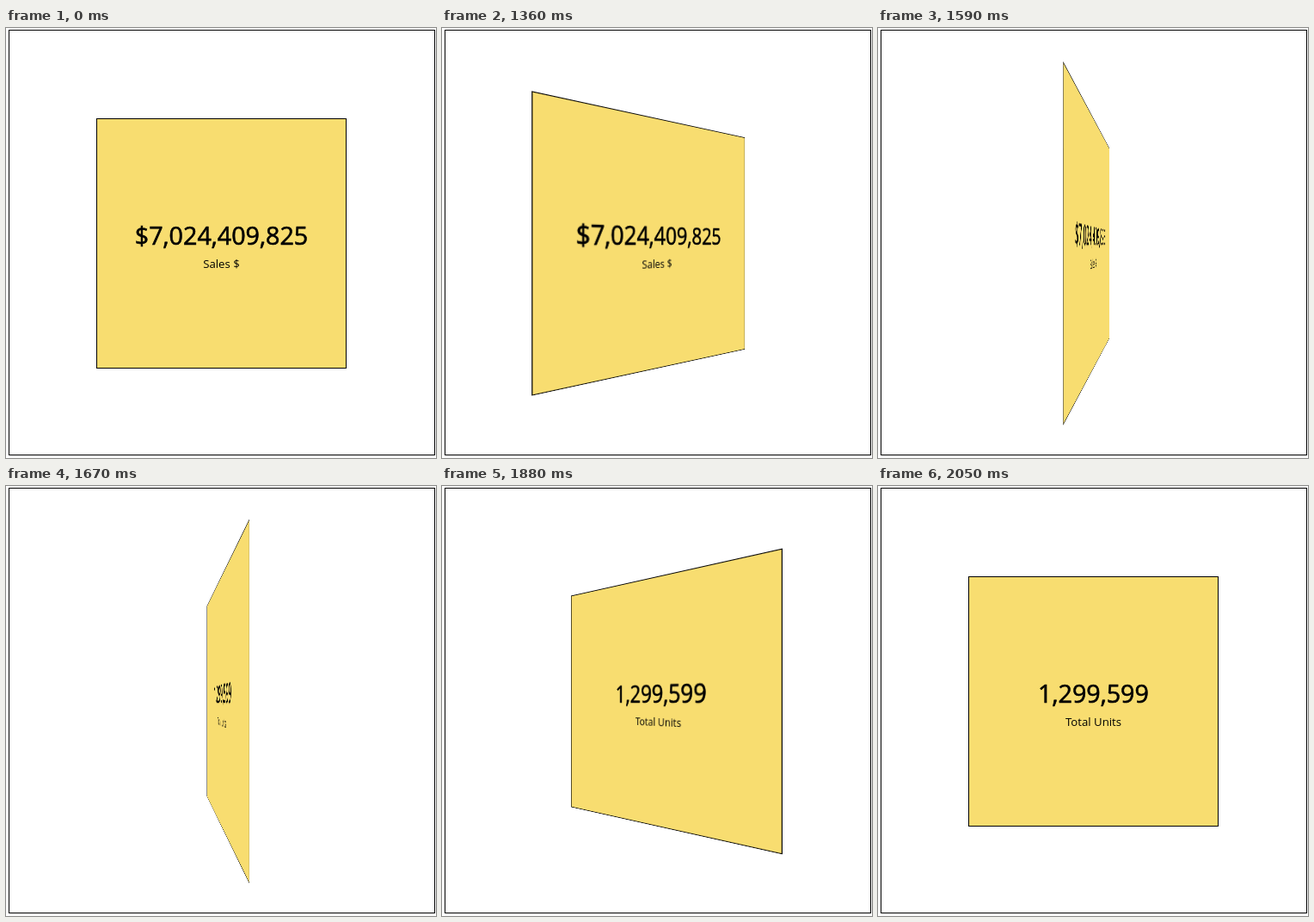
An HTML page that plays this animation: 500x500 px, repeating every 2.97 s.

```html
<!DOCTYPE html>
<html lang="en">
<head>
<meta charset="utf-8">
<title>Flip card</title>
<style>
  html, body { margin: 0; width: 100%; height: 100%; overflow: hidden; background: #fff; }
  .stage { position: relative; width: 500px; height: 500px; overflow: hidden; }
  .frame {
    position: absolute; left: 3px; top: 2px; width: 496px; height: 495px;
    box-sizing: border-box; border: 1px solid #000;
  }
  .scene {
    position: absolute; left: 105px; top: 105px; width: 291px; height: 291px;
    perspective: 458px;
  }
  .card { position: absolute; inset: 0; transform-style: preserve-3d; }
  .face {
    position: absolute; inset: 0; box-sizing: border-box;
    border: 1px solid #000; background: #f8dd70; color: #000;
    backface-visibility: hidden; text-align: center; white-space: nowrap;
    font-family: "Open Sans", "Noto Sans", sans-serif;
  }
  .back { transform: rotateY(180deg); }
  .value, .label { position: absolute; left: 0; right: 0; }
  .value { top: 115px; font-size: 28.7px; line-height: 40px; -webkit-text-stroke: 0.6px #000; }
  .label { top: 158px; font-size: 13.2px; line-height: 20px; }
</style>
</head>
<body>
<div class="stage">
  <div class="frame"></div>
  <div class="scene">
    <div class="card" id="card">
      <div class="face">
        <div class="value">$7,024,409,825</div>
        <div class="label">Sales $</div>
      </div>
      <div class="face back">
        <div class="value">1,299,599</div>
        <div class="label">Total Units</div>
      </div>
    </div>
  </div>
</div>
<script>
  const LOOP = 2970;
  const FLIP_START = 1240;
  const STEP_TIME = 42.6;
  const FIRST_ANGLE = 6.8;
  const STEP_ANGLE = 9.2;
  const card = document.getElementById("card");
  const start = performance.now();

  // A steady half turn, shown in discrete steps
  function angleAt(time) {
    if (time < FLIP_START) return 0;
    const step = Math.floor((time - FLIP_START) / STEP_TIME + 0.2);
    return Math.min(180, FIRST_ANGLE + step * STEP_ANGLE);
  }

  function draw() {
    const time = Math.max(0, performance.now() - start) % LOOP;
    card.style.transform = `rotateY(${angleAt(time)}deg)`;
    requestAnimationFrame(draw);
  }
  draw();
</script>
</body>
</html>
```
